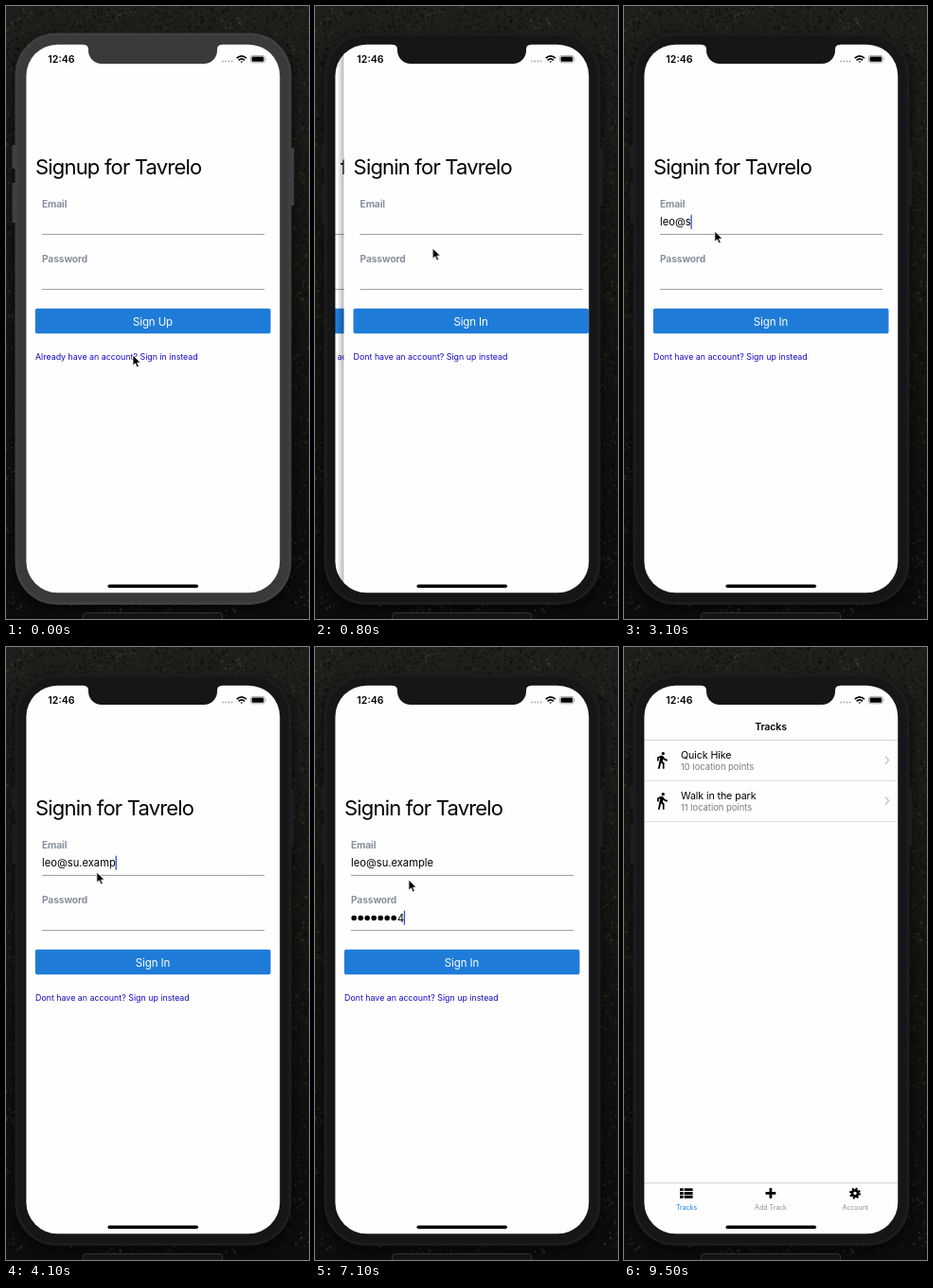
An HTML page with a canvas that plays this animation: 320x648 px, repeating every 9.9 s.

```html
<!DOCTYPE html>
<html lang="en">
<head>
<meta charset="utf-8">
<title>Sign in demo</title>
<style>
html, body { margin: 0; width: 100%; height: 100%; overflow: hidden; background: #141412; }
canvas, svg { position: absolute; left: 0; top: 0; width: 320px; height: 648px; display: block; }
text { font-family: Inter, Roboto, sans-serif; white-space: pre; }

.frame, .bezel, .slide, .under, .tracks, .rows, .cursor { animation: 9900ms infinite step-end; }
.frame { fill: #1d1c1e; animation-name: frame; }
.bezel { fill: #161517; animation-name: bezel; }
@keyframes frame { 0% { fill: #403f41; } 1.01%, 100% { fill: #1d1c1e; } }
@keyframes bezel { 0% { fill: #3a393b; } 1.01%, 100% { fill: #161517; } }

.slide { animation-name: slide; }
.under { animation-name: under; }
@keyframes slide {
  0% { transform: translateX(275px); }
  5.43% { transform: translateX(267px); animation-timing-function: cubic-bezier(.2833, .99, .31833, .99); }
  10.48%, 100% { transform: none; }
}
@keyframes under {
  0% { transform: none; }
  5.43% { transform: none; animation-timing-function: cubic-bezier(.2833, .99, .31833, .99); }
  10.48%, 100% { transform: translateX(-80px); }
}

.tracks { animation-name: tracks; }
.rows { animation-name: rows; }
@keyframes tracks { 0% { opacity: 0; } 80.81%, 100% { opacity: 1; } }
@keyframes rows { 0% { opacity: 0; } 82.83%, 100% { opacity: 1; } }

.cursor { animation-name: cursor; animation-timing-function: ease-in-out; }
@keyframes cursor {
  0%, 3.03% { transform: translate(134px, 369px); }
  8.08%, 12.12% { transform: translate(124.3px, 256px); }
  17.17%, 70.7% { transform: translate(95.8px, 238px); }
  75.76%, 86.87% { transform: translate(133px, 333px); opacity: 1; }
  88.89% { transform: translate(43px, 67px); opacity: 1; animation-timing-function: step-end; }
  90.9%, 100% { transform: translate(43px, 67px); opacity: 0; }
}

.title { font-size: 22px; letter-spacing: -.037em; }
.label { font-size: 10.2px; font-weight: 700; letter-spacing: -.01em; fill: #86909c; }
.entry { font-size: 11.2px; }
.button { font-size: 11.5px; letter-spacing: -.01em; fill: #fff; }
.link { font-size: 8.85px; fill: #1509c4; }
.head { font-size: 10.6px; font-weight: 600; letter-spacing: -.015em; }
.name { font-size: 10.7px; letter-spacing: -.01em; }
.note { font-size: 9.4px; fill: #7b7b7e; }
.tab { font-size: 7px; fill: #8e8e93; }
.clock { font-size: 10.6px; font-weight: 600; }
.mid { text-anchor: middle; }
</style>
</head>
<body>
<canvas id="forest" width="320" height="648"></canvas>
<svg viewBox="0 0 320 648">
  <defs>
    <clipPath id="screen"><rect x="21.400" y="40.700" width="267.800" height="579.500" rx="33"/></clipPath>
    <linearGradient id="edge">
      <stop offset="0" stop-color="#000" stop-opacity="0"/>
      <stop offset="1" stop-color="#000" stop-opacity=".28"/>
    </linearGradient>
    <filter id="soft" x="-20%" y="-20%" width="140%" height="140%"><feGaussianBlur stdDeviation="6"/></filter>
    <g id="fields">
      <rect x="21" y="40" width="269" height="581" fill="#fefefe"/>
      <text class="label" x="38" y="213">Email</text>
      <text class="label" x="38" y="271">Password</text>
      <path d="M38 241.400H273M38 299.600H273" stroke="#86909c" stroke-width=".9"/>
      <rect x="30.900" y="319.800" width="248.600" height="26.400" rx="2" fill="#1e7cd8"/>
    </g>
    <g id="row">
      <path transform="translate(30.1 109.700) scale(.83)" d="M13.500 5.500c1.100 0 2-.9 2-2s-.9-2-2-2-2 .9-2 2 .9 2 2 2zM9.800 8.900L7 23h2.100l1.800-8 2.100 2v6h2v-7.500l-2.100-2 .6-3C14.800 12 16.800 13 19 13v-2c-1.900 0-3.500-1-4.300-2.400l-1-1.600c-.4-.6-1-1-1.700-1-.3 0-.5.1-.8.1L6 8.300V13h2V9.600l1.800-.7"/>
      <path d="M276 115.500l3.600 4-3.600 4" fill="none" stroke="#c2c2c7" stroke-width="1.200"/>
      <path d="M21 141.400H290" stroke="#d6d6d9" stroke-width=".8"/>
    </g>
  </defs>

  <rect x="8" y="34" width="296" height="604" rx="44" fill="#000" opacity=".55" filter="url(#soft)"/>
  <rect x="81.500" y="641.500" width="147" height="14" rx="3" fill="#131313" stroke="#343434"/>
  <path class="frame" d="M6.500 147h4v25h-4zM6.500 187h4v42h-4zM301 150h3.200v61h-3.200z"/>
  <rect class="frame" x="9.500" y="28.500" width="292" height="604.500" rx="44"/>
  <rect class="bezel" x="12.500" y="31.500" width="286" height="598.500" rx="41"/>

  <g clip-path="url(#screen)">
    <g class="under">
      <use href="#fields"/>
      <text class="title" x="31" y="178">Signup for Tavrelo</text>
      <text class="button mid" x="155" y="337.600">Sign Up</text>
      <text class="link" x="31" y="374">Already have an account? Sign in instead</text>
    </g>
    <g class="slide">
      <rect x="14" y="40" width="7" height="581" fill="url(#edge)"/>
      <use href="#fields"/>
      <text class="title" x="31" y="178">Signin for Tavrelo</text>
      <text class="button mid" x="155" y="337.600">Sign In</text>
      <text class="link" x="31" y="374">Dont have an account? Sign up instead</text>
      <text class="entry" id="email" x="38" y="232.200"></text>
      <path id="dots" stroke="#000" stroke-width="5.600" stroke-linecap="round" stroke-dasharray="0 7"/>
      <text class="entry" id="digit" y="290.700"></text>
      <rect id="caret" width="1.300" height="15" fill="#3850c8"/>
    </g>
    <g class="tracks">
      <rect x="21" y="40" width="269" height="581" fill="#fefefe"/>
      <text class="head mid" x="155" y="87.700">Tracks</text>
      <path d="M21 98.400H290M21 566.500H290" stroke="#c9c9cc" stroke-width=".8"/>
      <g class="rows">
        <use href="#row"/>
        <use href="#row" y="43"/>
        <text class="name" x="60" y="117.800">Quick Hike</text>
        <text class="note" x="60" y="129.700">10 location points</text>
        <text class="name" x="60" y="160.800">Walk in the park</text>
        <text class="note" x="60" y="172.700">11 location points</text>
      </g>
      <path d="M59 572.200h3.600v2.900H59zm4.600 0h9v2.900h-9zM59 576h3.600v2.900H59zm4.600 0h9v2.900h-9zM59 579.800h3.600v2.900H59zm4.600 0h9v2.900h-9z"/>
      <path d="M149.500 577.300h10.800M154.900 571.900v10.800" stroke="#000" stroke-width="2.800"/>
      <g fill="none" stroke="#000">
        <circle cx="244" cy="577.500" r="3.100" stroke-width="2.700"/>
        <circle cx="244" cy="577.500" r="5" stroke-width="1.900" stroke-dasharray="1.960 1.967"/>
      </g>
      <text class="tab mid" x="66" y="595" style="fill:#1479f0">Tracks</text>
      <text class="tab mid" x="155" y="595">Add Track</text>
      <text class="tab mid" x="244.300" y="595">Account</text>
    </g>
    <text class="clock" x="44.300" y="60">12:46</text>
    <path d="M229 58.500h12" stroke="#aaa" stroke-width="1.800" stroke-linecap="round" stroke-dasharray="0 3.200"/>
    <g fill="none" stroke="#000" stroke-width="1.700">
      <path d="M243.700 55.200q5.100-4.600 10.200 0M245.600 57.300q3.200-2.800 6.400 0"/>
      <path d="M247.300 58.400h3l-1.500 1.500z" stroke="none" fill="#000"/>
    </g>
    <rect x="258.500" y="52.400" width="14.800" height="7.400" rx="2.200" fill="none" stroke="#888" stroke-width=".7"/>
    <rect x="259.600" y="53.500" width="12.600" height="5.200" rx="1.200"/>
    <path d="M274.300 54.800q1.200 1.300 0 2.600z" fill="#888"/>
    <rect x="107.500" y="611.500" width="95.500" height="3.500" rx="1.750"/>
  </g>
  <path class="bezel" d="M82 40v1q5 0 5 5v1a14 14 0 0 0 14 14h108a14 14 0 0 0 14-14v-1q0-5 5-5v-1z"/>
  <path class="cursor" d="M0 0v11.200l2.600-2.400 1.800 4.200 2-.9-1.800-4h3.500z" fill="#000" stroke="#fff" stroke-width=".8"/>
</svg>

<script>
const LOOP = 9900;
const EMAIL = 'leo@su.example', PASS = '12341234';
const emailAt = [2200, 2400, 2600, 2800, 3000, 3200, 3300, 3400, 3500, 3600, 3700, 3900, 4200, 4300];
const passAt = [5300, 5400, 5500, 5600, 5700, 5800, 5900, 6200];
const [email, dots, digit, caret] = ['email', 'dots', 'digit', 'caret'].map(id => document.getElementById(id));

// Dark foliage: leaf specks, gathered into brighter and dimmer clumps.
function paintForest() {
  const c = document.getElementById('forest').getContext('2d');
  let seed = 7;
  const rand = () => (seed = seed * 16807 % 2147483647) / 2147483647;
  const base = c.createLinearGradient(0, 0, 0, 648);
  base.addColorStop(0, '#1f1f1c');
  base.addColorStop(.4, '#171713');
  base.addColorStop(1, '#0c0c0b');
  c.fillStyle = base;
  c.fillRect(0, 0, 320, 648);
  for (let i = 0; i < 12000; i++) {
    const x = rand() * 320, y = rand() * 640;
    const clump = .5 + .5 * Math.sin(x / 13 + 2 * Math.sin(y / 19)) * Math.sin(y / 11 + x / 40);
    const v = rand() < .55 * clump ? 38 + rand() * 50 * clump : 5 + rand() * 16;
    c.fillStyle = `rgba(${v}, ${v * .97}, ${v * .78}, .5)`;
    c.beginPath();
    c.ellipse(x, y, .6 + rand() * 1.5, .5 + rand(), rand() * 3, 0, 7);
    c.fill();
  }
}

const typed = (times, t) => times.filter(at => at <= t).length;

function caretOn(t) {
  if (t < 1700 || t >= 7600) return false;
  return !(t >= 4500 && t < 5000) && !(t >= 6700 && t < 7100);
}

function draw(t) {
  const n = typed(emailAt, t), p = typed(passAt, t);
  email.textContent = EMAIL.slice(0, n);
  dots.setAttribute('d', p > 1 ? `M41.200 286.500h${7 * (p - 2) + .1}` : '');
  digit.textContent = p ? PASS[p - 1] : '';
  digit.setAttribute('x', 38 + 7 * Math.max(0, p - 1));
  const inPass = t >= 5000;
  const end = inPass ? 38 + 7 * p : 38 + (n ? email.getComputedTextLength() : 0);
  caret.setAttribute('x', end - .2);
  caret.setAttribute('y', inPass ? 278.700 : 220.700);
  caret.setAttribute('opacity', caretOn(t) ? 1 : 0);
}

let start;
function tick(now) {
  start ??= now;
  draw((now - start) % LOOP);
  requestAnimationFrame(tick);
}
paintForest();
requestAnimationFrame(tick);
</script>
</body>
</html>
```
